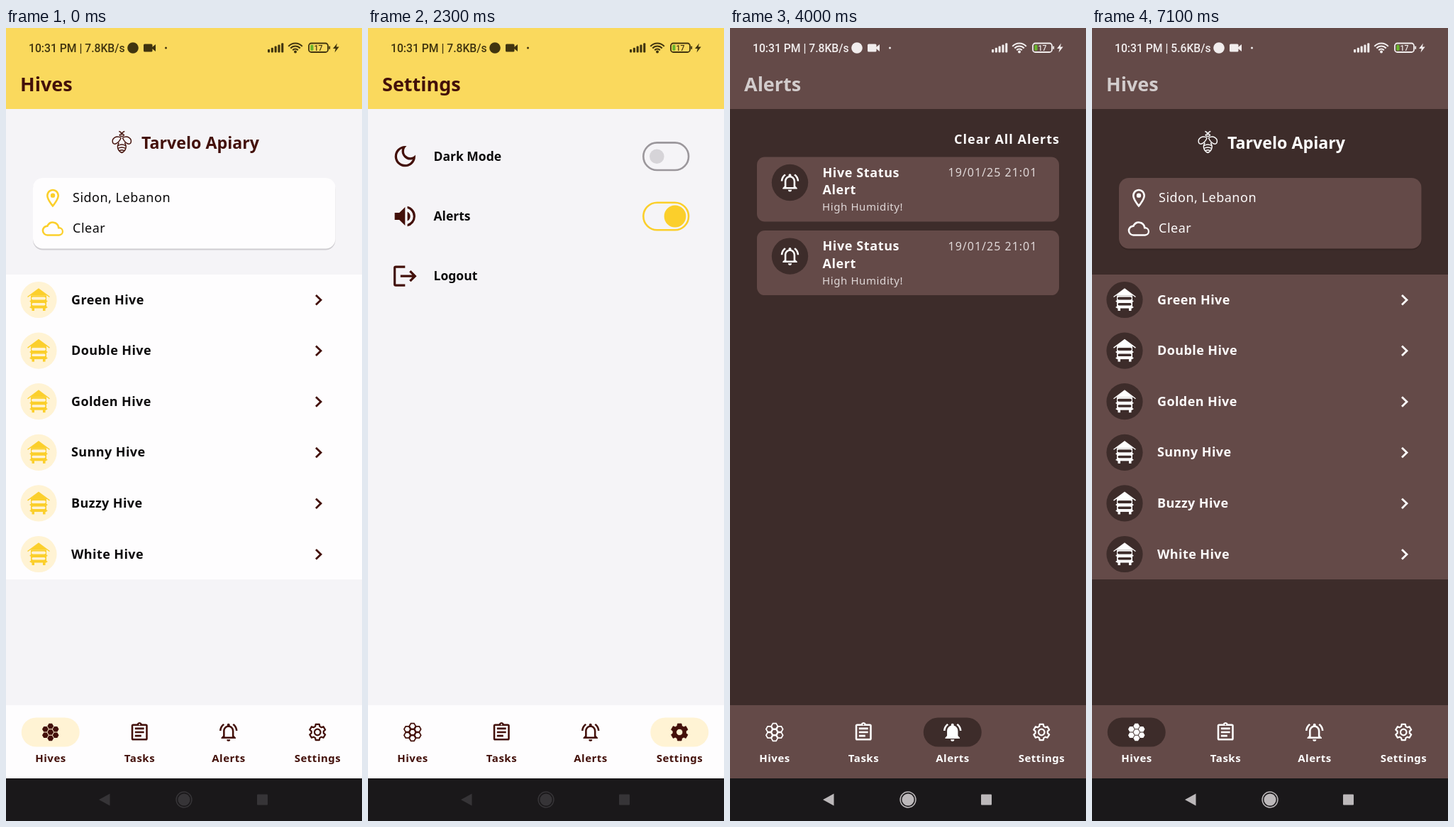
These frames come from a looping animation (502x1116 px, 7.9 s). An HTML page:

```html
<!DOCTYPE html>
<html lang="en">
<head>
<meta charset="utf-8">
<title>Hive app</title>
<style>
html, body { margin: 0; width: 100%; height: 100%; overflow: hidden; }
svg { display: block; width: 100%; height: 100%; }
text { font-family: "Noto Sans", sans-serif; white-space: pre; }
.status { font: 500 15.7px Roboto, sans-serif; }
.charge { font: 500 10.5px Roboto, sans-serif; text-anchor: middle; }
.title { font-size: 27px; font-weight: 600; }
.heading { font-size: 23.2px; font-weight: 600; }
.info { font-size: 18px; font-weight: 500; letter-spacing: .5px; }
.row { font-size: 18px; font-weight: 600; letter-spacing: .4px; }
.setting { font-size: 17.5px; font-weight: 700; }
.item { font-size: 18px; font-weight: 600; letter-spacing: .6px; }
.clear { font-size: 18px; font-weight: 600; letter-spacing: 1px; text-anchor: end; }
.note { font-size: 15px; letter-spacing: .6px; }
.date { font-size: 16px; letter-spacing: .6px; }
.stamp { font-size: 16px; letter-spacing: 1px; }
.tab { font-size: 15px; font-weight: 600; letter-spacing: .5px; text-anchor: middle; }
</style>
</head>
<body>
<svg id="stage" viewBox="0 0 502 1116" preserveAspectRatio="none"></svg>
<script>
const LOOP = 7900;
const ACCENT = '#fbcf2b';
const LIGHT = {
  bar: '#fad95d', title: '#43100a', bg: '#f5f4f7', card: '#fefdfe', shadow: '#cfcdd1',
  text: '#0b0a0b', icon: '#43100a', accent: ACCENT, pill: '#fff3d4', keys: '#363437'
};
const DARK = {
  bar: '#644a48', title: '#d2cccc', bg: '#3d2c2a', card: '#644a48', shadow: '#352523',
  text: '#fdfbfb', soft: '#e0d8d8', icon: '#fefefe', accent: '#fefefe', pill: '#3d2c2a', keys: '#bcb8ba'
};
const TITLES = { Hives: 'Hives', Tasks: 'My Tasks', Alerts: 'Alerts', Settings: 'Settings' };
const TABS = Object.keys(TITLES);

const BELL = 'M7.58 4.08L6.15 2.65C3.75 4.48 2.17 7.3 2.03 10.5h2c.15-2.65 1.51-4.97 3.55-6.42zm12.39 6.42h2c-.15-3.2-1.73-6.02-4.12-7.85l-1.42 1.43c2.02 1.45 3.39 3.77 3.54 6.42zM18 11c0-3.07-1.64-5.64-4.5-6.32V4c0-.83-.67-1.5-1.5-1.5s-1.5.67-1.5 1.5v.68C7.63 5.36 6 7.92 6 11v5l-2 2v1h16v-1l-2-2zM10 20a2 2 0 0 0 4 0z';
const BELL_LINE = BELL + 'M16 17H8v-6c0-2.48 1.51-4.5 4-4.5s4 2.02 4 4.5z';
const BOARD = 'M19 3h-4.18a3 3 0 0 0-5.64 0H5a2 2 0 0 0-2 2v14a2 2 0 0 0 2 2h14a2 2 0 0 0 2-2V5a2 2 0 0 0-2-2z';
const LINES = 'M7 7h10v2H7zM7 11h10v2H7zM7 15h7v2H7z';
const CLIP = 'M12 2.8a.8.8 0 0 1 0 1.6a.8.8 0 0 1 0-1.6z';
const PIN = 'M12 2C8.13 2 5 5.13 5 9c0 5.25 7 13 7 13s7-7.75 7-13c0-3.87-3.13-7-7-7zM7 9a5 5 0 0 1 10 0c0 2.88-2.88 7.19-5 9.88C9.92 16.21 7 11.85 7 9zM12 6.5a2.5 2.5 0 0 1 0 5a2.5 2.5 0 0 1 0-5z';
const CLOUD = 'M19.35 10.04A7.5 7.5 0 0 0 5.35 8.04A6 6 0 0 0 6 20h13a5 5 0 0 0 .35-9.96zM19 18H6a4 4 0 0 1 0-8h.71A5.5 5.5 0 0 1 17.5 11.5v.5H19a3 3 0 0 1 0 6z';
const MOON = 'M9.37 5.51A7.4 7.4 0 0 0 18.49 14.63A7 7 0 1 1 9.37 5.51zM12 3a9 9 0 1 0 8.9 7.64A5.4 5.4 0 1 1 13.36 3.1A9 9 0 0 0 12 3z';
const SOUND = 'M3 9v6h4l5 5V4L7 9zM16.5 12A4.5 4.5 0 0 0 14 7.97v8.05A4.5 4.5 0 0 0 16.5 12zM14 3.23v2.06a7 7 0 0 1 0 13.42v2.06a9 9 0 0 0 0-17.54z';
const EXIT = 'M17 7l-1.41 1.41L18.17 11H8v2h10.17l-2.58 2.58L17 17l5-5zM4 5h8V3H4a2 2 0 0 0-2 2v14a2 2 0 0 0 2 2h8v-2H4z';

const range = (n, f) => Array.from({ length: n }, (_, i) => f(i)).join('');
const rect = (x, y, w, h, fill, r = 0) => `<rect x="${x}" y="${y}" width="${w}" height="${h}" rx="${r}" fill="${fill}"/>`;
const circle = (x, y, r, fill) => `<circle cx="${x}" cy="${y}" r="${r}" fill="${fill}"/>`;
const ring = (x, y, r, color, w) => `<circle cx="${x}" cy="${y}" r="${r}" fill="none" stroke="${color}" stroke-width="${w}"/>`;
const fillPath = (d, color) => `<path d="${d}" fill="${color}" fill-rule="evenodd"/>`;
const line = (d, color, w) => `<path d="${d}" fill="none" stroke="${color}" stroke-width="${w}"/>`;
const text = (cls, x, y, fill, s) => `<text class="${cls}" x="${x}" y="${y}" fill="${fill}">${s}</text>`;
const at = (x, y, body, s = 1) => `<g transform="translate(${x} ${y}) scale(${s})">${body}</g>`;
const icon = (x, y, d, color, s = 1.28) => at(x, y, `<g transform="translate(-12 -12)">${fillPath(d, color)}</g>`, s);

const polygon = points => 'M' + points.map(([deg, r]) => {
  const a = deg * Math.PI / 180;
  return `${(r * Math.cos(a)).toFixed(2)} ${(r * Math.sin(a)).toFixed(2)}`;
}).join('L') + 'Z';
const SIX = [0, 60, 120, 180, 240, 300];

function gear(color, full) {
  const teeth = SIX.flatMap(a => [[a + 9, 7.3], [a + 17, 9.6], [a + 43, 9.6], [a + 51, 7.3]]);
  const hole = 'M0-3.6a3.6 3.6 0 0 1 0 7.2a3.6 3.6 0 0 1 0-7.2z';
  const d = polygon(teeth) + hole;
  return full
    ? `<g stroke="${color}" stroke-width=".6" stroke-linejoin="round">${fillPath(d, color)}</g>`
    : `<g transform="scale(.93)" stroke-linejoin="round">${line(d, color, 1.9)}</g>`;
}

function comb(color, full) {
  const hex = polygon(SIX.map(a => [a, full ? 4.4 : 4.5]));
  const cell = full ? fillPath(hex, color) : line(hex, color, 1.7);
  return at(0, 0, cell) + range(6, i => {
    const a = (30 + 60 * i) * Math.PI / 180, d = 8.5;
    return at(d * Math.cos(a), d * Math.sin(a), cell);
  });
}

const TAB_ICONS = {
  Hives: comb,
  Tasks: (c, full) => icon(0, 0, BOARD + CLIP + LINES + (full ? '' : 'M5 5h14v14H5z'), c),
  Alerts: (c, full) => icon(0, 0, full ? BELL : BELL_LINE, c),
  Settings: (c, full) => at(0, 0, gear(c, full), 1.28)
};

function bee(c) {
  return line('M-4-15Q0-14 0-10Q0-14 4-15M-3.5-9.5Q0-14 3.5-9.5M-3.5-9.5Q0-6.5 3.5-9.5'
    + 'M-1-6C-8-10-14-5-13 0C-12 5-5 3-1-6M1-6C8-10 14-5 13 0C12 5 5 3 1-6'
    + 'M-4 1C-8 7-5 13 0 15C5 13 8 7 4 1M-5 5Q0 2 5 5M-5.5 9Q0 6 5.5 9M-3.5 12.5Q0 10 3.5 12.5', c, 1.4);
}

function hive(c) {
  return circle(0, 0, 25.6, c.pill)
    + fillPath('M0-15.5L12-6H-12Z', c.accent)
    + line('M-15.5-4L0-15.5L15.5-4', c.accent, 1.4)
    + rect(-11, -6, 22, 18, c.accent)
    + rect(-10, -4, 20, 4, c.pill, 2) + rect(-9.5, 4.5, 19, 3.5, c.pill, 1.7)
    + rect(-12.5, 1, 25, 2, c.accent, 1) + rect(-12.5, 9.5, 25, 1.8, c.accent, .9)
    + rect(-9.5, 11, 3.5, 4.5, c.accent) + rect(6, 11, 3.5, 4.5, c.accent);
}

const PAGES = {
  Hives(c) {
    const names = ['Green', 'Double', 'Golden', 'Sunny', 'Buzzy', 'White'];
    return at(163.3, 160.5, bee(c.icon)) + text('heading', 191, 169.5, c.icon, 'Tarvelo Apiary')
      + rect(38, 213, 426.5, 99.5, c.shadow, 14) + rect(38, 211, 426.5, 99.5, c.card, 14)
      + icon(66, 239.5, PIN, c.accent) + text('info', 94, 245, c.text, 'Sidon, Lebanon')
      + icon(66, 282.5, CLOUD, c.accent) + text('info', 94, 288, c.text, 'Clear')
      + rect(0, 347, 502, 429, c.card)
      + range(6, i => at(0, 382.5 + 71.6 * i,
        at(46, 0, hive(c)) + text('row', 92, 6, c.text, names[i] + ' Hive')
        + line('M437-6.5L444 .2L437 7', c.icon, 2.8)));
  },
  Settings(c, dark) {
    const toggle = (y, on) =>
      `<rect x="388.3" y="${y - 19.3}" width="63.8" height="38.6" rx="19.3" fill="none" stroke="${on ? ACCENT : '#9b979c'}" stroke-width="2.6"/>`
      + (on ? circle(433, y, 15.4, ACCENT) : circle(407.3, y, 10.3, '#d6d4d8'));
    const entry = (y, d, label) => icon(52.3, y, d, c.icon, 1.63) + text('setting', 92.5, y + 6, c.text, label);
    return entry(180.7, MOON, 'Dark Mode') + entry(265, SOUND, 'Alerts') + entry(349.2, EXIT, 'Logout')
      + toggle(180.7, dark) + toggle(265, true);
  },
  Alerts(c) {
    return text('clear', 465, 162.5, c.text, 'Clear All Alerts')
      + range(2, i => at(0, 181.5 + 103.6 * i,
        rect(38, 0, 426, 91, c.card, 11) + circle(84.5, 36, 25.7, c.pill) + icon(84.5, 36, BELL_LINE, c.icon)
        + text('item', 130.5, 28, c.text, 'Hive Status') + text('item', 130.5, 52.5, c.text, 'Alert')
        + text('note', 130, 75.5, c.soft, 'High Humidity!') + text('stamp', 307.5, 27.5, c.soft, '19/01/25 21:01')));
  },
  Tasks(c) {
    const tasks = ['Double Hive Task', 'Feed Task', 'Frame Relocation', 'Hive Addition', 'Health Check'];
    return range(5, i => at(0, 144.5 + 117.6 * i,
      rect(38, 0, 426, 105, c.card, 11)
      + (i % 2 ? circle(66.5, 52.7, 12.9, c.icon) + line('M59.5 53L64.5 58L74 48.3', c.card, 2.5)
               : ring(66.5, 52.7, 11.6, c.icon, 2.5))
      + text('item', 102, 47, c.text, tasks[i]) + text('date', 103, 73, c.soft, 'Jan 19, 2025')
      + line('M429 49.5L435.6 56.2L442.2 49.5', c.icon, 2.7)));
  }
};

function statusBar(color, speed) {
  return text('status', 32, 33.5, color, `10:31 PM | ${speed}KB/s`)
    + circle(179, 28, 7.8, color)
    + rect(194, 22.5, 12.5, 11, color, 1.5) + fillPath('M206 27L211 23V33L206 29Z', color)
    + circle(225.5, 28, 1.5, color)
    + range(5, i => rect(369 + 4.8 * i, 30 - 2.2 * i, 3.1, 4.5 + 2.2 * i, color, 1))
    + [5, 9, 13].map(r => line(`M${408 - .75 * r} ${34.5 - .66 * r}A${r} ${r} 0 0 1 ${408 + .75 * r} ${34.5 - .66 * r}`, color, 2.1)).join('')
    + circle(408, 33.5, 2, color)
    + `<rect x="427" y="21.5" width="27" height="12.5" rx="3.5" fill="none" stroke="${color}" stroke-width="1.8"/>`
    + rect(455.3, 25.5, 1.8, 4.5, color, .8) + rect(429.3, 23.8, 4.2, 8, '#68b52c', 1)
    + text('charge', 440.5, 31.6, color, '17')
    + fillPath('M467 21.5L461 29H464.7L463.5 34.5L469.7 26.5H465.8Z', color);
}

function tabBar(c, page, pill) {
  return rect(0, 953, 502, 103, c.card) + TABS.map((name, i) => {
    const x = 62.75 + 125.5 * i;
    return (name === pill ? rect(x - 41, 970.5, 82, 41, c.pill, 20.5) : '')
      + at(x, 991, TAB_ICONS[name](c.icon, name === page))
      + text('tab', x + .25, 1033, c.icon, name);
  }).join('');
}

const systemKeys = color => rect(0, 1056, 502, 60, '#1a181a')
  + fillPath('M131 1086L146.5 1077.5V1094.5Z', color)
  + ring(251, 1086, 10.9, color, 1.5) + circle(251, 1086, 8.6, color)
  + rect(354, 1078.5, 15, 15, color, 1);

const pageAt = t => t < 1500 ? 'Hives' : t < 3900 ? 'Settings' : t < 4900 ? 'Alerts' : t < 5500 ? 'Tasks' : 'Hives';

const stage = document.getElementById('stage');
let shown = '';

function frame(now) {
  const t = now % LOOP;
  const page = pageAt(t);
  const pill = pageAt(t - 100);   // the highlight follows the page a moment later
  const dark = t >= 2400;
  const ink = !dark ? '#40340f' : t < 2500 ? '#1c1414' : '#f1eded';
  const speed = t < 6600 ? '7.8' : '5.6';
  const key = [page, pill, dark, ink, speed].join();
  if (key !== shown) {
    shown = key;
    const c = dark ? DARK : LIGHT;
    stage.innerHTML = rect(0, 0, 502, 1116, c.bg) + rect(0, 0, 502, 114, c.bar)
      + statusBar(ink, speed) + text('title', 20, 89, c.title, TITLES[page])
      + PAGES[page](c, dark) + tabBar(c, page, pill) + systemKeys(c.keys);
  }
  requestAnimationFrame(frame);
}
frame(performance.now());
</script>
</body>
</html>
```
